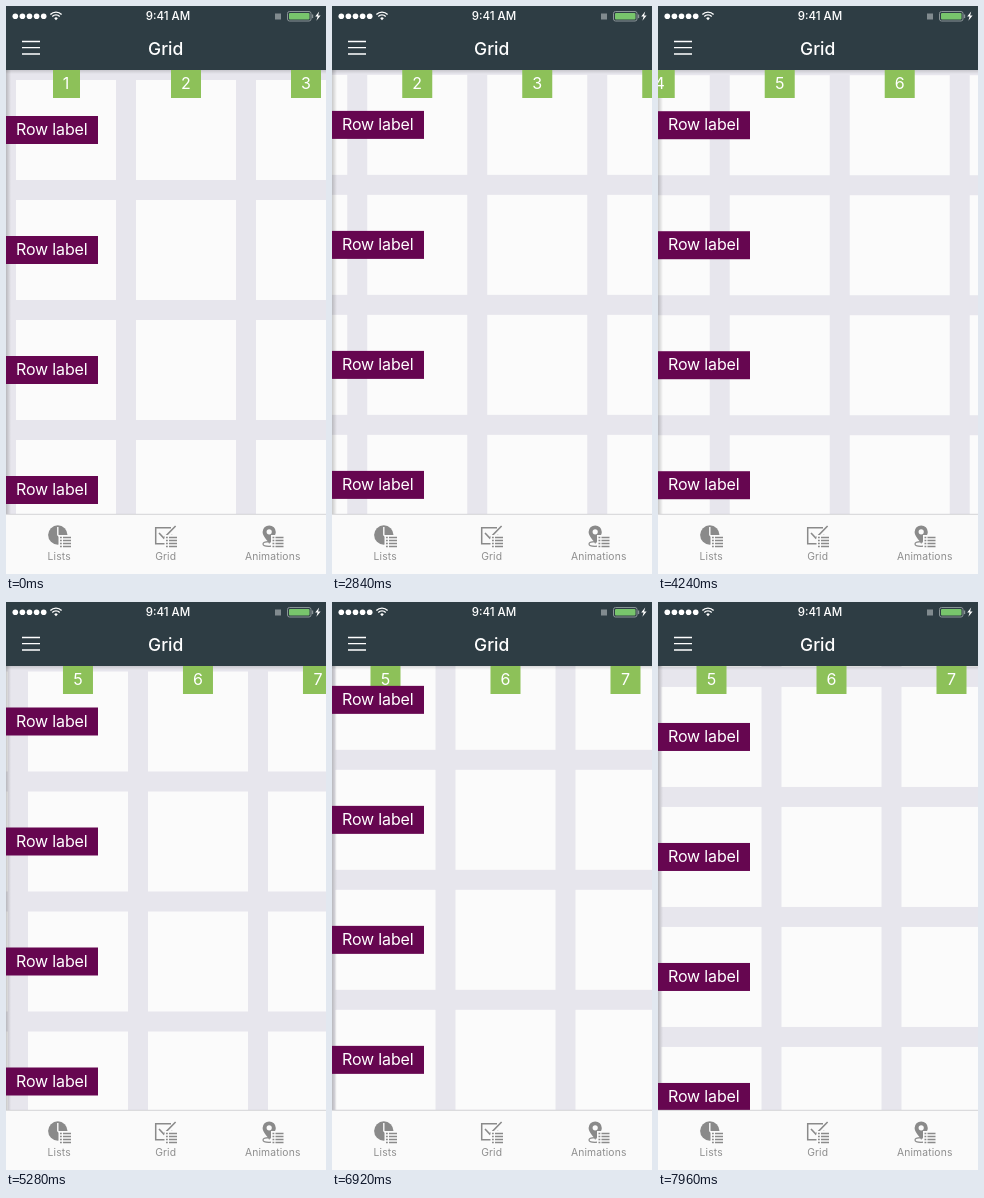
Recreate the animation shown at these times as an HTML page. Size 320 by 568 pixels, loop 8 s.

```html
<!DOCTYPE html>
<html lang="en">
<head>
<meta charset="utf-8">
<title>Grid</title>
<style>
  html, body { margin: 0; width: 100%; height: 100%; overflow: hidden; }
  body { font-family: Inter, Roboto, sans-serif; }
  #stage { position: relative; width: 320px; height: 568px; overflow: hidden; background: #e7e6ed; }
  #view { position: absolute; left: 0; top: 64px; width: 320px; height: 444px; overflow: hidden; }
  #view > div { position: absolute; left: 0; top: 0; }
  #view i { position: absolute; font-style: normal; }
  .cell { width: 100px; height: 100px; background: #fbfbfb; }
  .tag { box-sizing: border-box; height: 27.5px; padding: 0 10px; color: #fff;
    font-size: 16px; line-height: 27.5px; white-space: nowrap; }
  .col { background: #8dc159; width: 30px; top: 0; padding: 0; text-align: center; }
  .col.one { width: 27px; }
  .row { background: #660650; width: 91.5px; left: 0; letter-spacing: -.15px; }
  #edge { width: 5px; height: 444px; background: linear-gradient(90deg, #0003, #0000); }
  #drop { width: 320px; height: 4px; background: linear-gradient(#0002, #0000); }
  svg { position: absolute; left: 0; top: 0; }
</style>
</head>
<body>
<div id="stage">
  <div id="view">
    <div id="cells"></div>
    <div id="edge"></div>
    <div id="drop"></div>
    <div id="cols"></div>
    <div id="rows"></div>
  </div>
  <svg width="320" height="568" viewBox="0 0 320 568">
    <defs>
      <g id="list">
        <path d="M-1.5-1.5h13.5v12.5h-13.5z" fill="#fafafa"/>
        <path d="M0 1h1.8M3 1h8M0 4h1.8M3 4h8M0 7h1.8M3 7h8M0 10h1.8M3 10h8" stroke="#8a8a8a" stroke-width="1.7"/>
      </g>
    </defs>
    <rect width="320" height="64" fill="#2e3d44"/>
    <g fill="#fff">
      <circle cx="9.3" cy="10.3" r="2.8"/><circle cx="16.4" cy="10.3" r="2.8"/>
      <circle cx="23.5" cy="10.3" r="2.8"/><circle cx="30.6" cy="10.3" r="2.8"/>
      <circle cx="37.7" cy="10.3" r="2.8"/>
      <path d="M48.2 12.2l1.8 2 1.8-2a2.6 2.6 0 0 0-3.6 0z"/>
      <path d="M313.2 5.6l-4 5h2.4l-1.2 4.2 4.2-5.3h-2.5z"/>
      <text x="162" y="14.3" font-size="11.5" font-weight="500" text-anchor="middle">9:41 AM</text>
      <text x="159.7" y="48.7" font-size="17.5" font-weight="500" text-anchor="middle">Grid</text>
    </g>
    <path d="M46.3 10.4a5.2 5.2 0 0 1 7.4 0M44.4 8.5a7.9 7.9 0 0 1 11.2 0" fill="none" stroke="#fff" stroke-width="1.4"/>
    <rect x="269" y="7.5" width="6" height="6" fill="#818b8f"/>
    <rect x="281.5" y="5.5" width="23.5" height="9.5" rx="2" fill="none" stroke="#8a9497"/>
    <rect x="283" y="7" width="20.5" height="6.5" rx="1" fill="#78c56c"/>
    <path d="M306.5 8.5v3.6" stroke="#8a9497" stroke-width="1.4"/>
    <path d="M16 35.5h18M16 41.7h18M16 48h18" stroke="#fff" stroke-width="1.3"/>

    <rect y="508" width="320" height="60" fill="#fafafa"/>
    <path d="M0 508.3h320" stroke="#c9c9cd" stroke-width=".8"/>
    <circle cx="51.8" cy="529" r="9.7" fill="#8a8a8a"/>
    <path d="M51.8 521v8l4.6 4" fill="none" stroke="#fafafa" stroke-width="1.4"/>
    <use href="#list" x="54" y="530.5"/>
    <path d="M165 521.8h-15.3v16h16v-9" fill="none" stroke="#8a8a8a" stroke-width="1.5"/>
    <path d="M153 527l4.8 5 11.8-12" fill="none" stroke="#8a8a8a" stroke-width="1.6"/>
    <use href="#list" x="160" y="530.5"/>
    <ellipse cx="263" cy="538" rx="6" ry="2.3" fill="none" stroke="#8a8a8a" stroke-width="1.2"/>
    <path d="M263.2 538c-2-4.5-6.6-7.6-6.6-12a6.6 6.6 0 0 1 13.2 0c0 4.4-4.6 7.5-6.6 12z" fill="#8a8a8a"/>
    <circle cx="263.2" cy="525.8" r="2.6" fill="#fafafa"/>
    <use href="#list" x="266.5" y="530.5"/>
    <g font-size="10.3" fill="#8e8e8e" text-anchor="middle" letter-spacing=".15">
      <text x="53.2" y="554.3">Lists</text>
      <text x="159.7" y="554.3">Grid</text>
      <text x="266.7" y="554.3">Animations</text>
    </g>
  </svg>
</div>
<script>
const LOOP = 8000, PITCH = 120, COUNT = 7, TAU = 800;

const hold = () => 0;
const drag = power => u => u ** power;
const fling = (u, ms) => (1 - Math.exp(-u * ms / TAU)) / (1 - Math.exp(-ms / TAU));

// [time, scroll offset, easing towards the next step]
const scrollX = [
  [0, 0, hold], [2320, 4.5, drag(2.3)], [2900, 120, fling],
  [3400, 291, fling], [5280, 468, fling], [6100, 486.5, hold], [LOOP, 486.5]
];
const scrollY = [
  [0, 0, hold], [2320, 0, drag(1.5)], [2900, 6, fling], [3400, 5.5, fling],
  [5280, 4.5, hold], [5840, 4.5, drag(1.8)], [6080, 59, fling],
  [6240, 118.5, fling], [6920, 266, fling], [7960, 349, fling], [LOOP, 350.5]
];

function valueAt(steps, t) {
  const i = steps.findIndex((s, n) => n + 1 === steps.length - 1 || t < steps[n + 1][0]);
  const [t0, v0, ease] = steps[i], [t1, v1] = steps[i + 1];
  return v0 + (v1 - v0) * ease((t - t0) / (t1 - t0), t1 - t0);
}

const layer = id => document.getElementById(id);
const cells = layer('cells'), cols = layer('cols'), rows = layer('rows');

function add(parent, cls, left, top, text = '') {
  const el = document.createElement('i');
  el.className = cls;
  el.style.left = left + 'px';
  el.style.top = top + 'px';
  el.textContent = text;
  parent.append(el);
}

for (let n = 0; n < COUNT; n++) {
  const start = 10 + n * PITCH;
  add(cols, n ? 'tag col' : 'tag col one', start + (n ? 35 : 36.5), 0, n + 1);
  add(rows, 'tag row', 0, start + 36.4, 'Row label');
  for (let m = 0; m < COUNT; m++) add(cells, 'cell', start, 10 + m * PITCH);
}

const move = (el, x, y) => { el.style.transform = `translate(${-x}px, ${-y}px)`; };

function draw(now) {
  const t = now % LOOP;
  const x = valueAt(scrollX, t), y = valueAt(scrollY, t);
  move(cells, x, y);
  move(cols, x, 0);
  move(rows, 0, y);
}

const begin = performance.now();
function tick() {
  draw(performance.now() - begin);
  requestAnimationFrame(tick);
}
tick();
</script>
</body>
</html>
```
